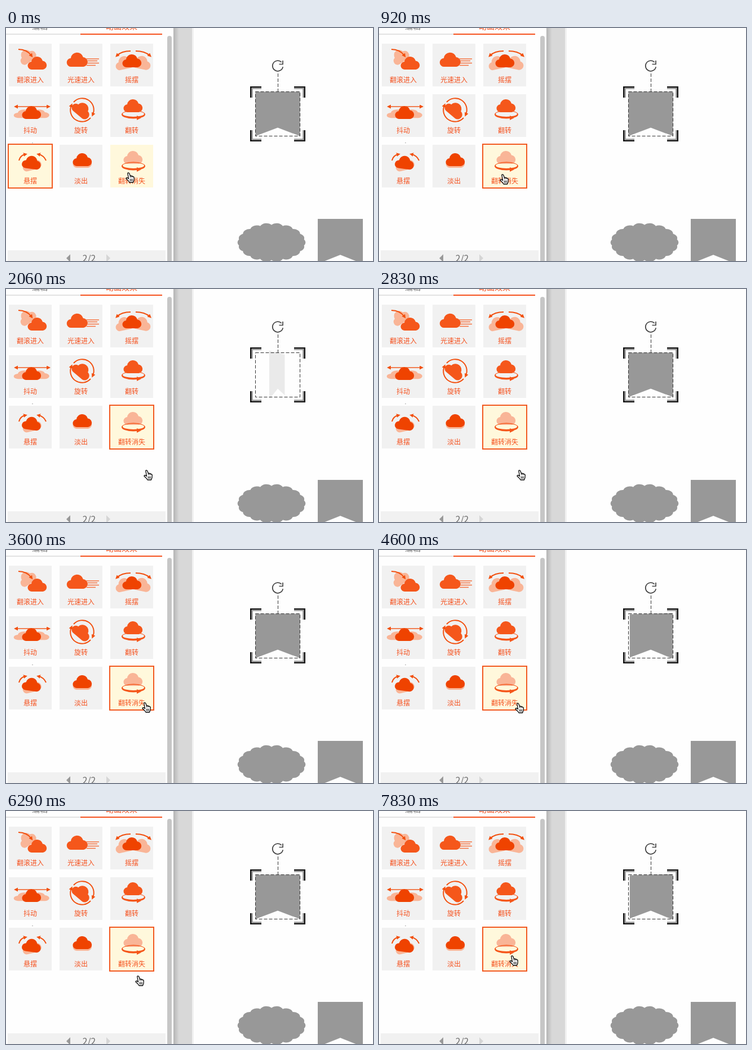
Write an HTML page that moves like this. It is 651 px wide and 415 px high and loops after 8000 ms.

```html
<!DOCTYPE html>
<html lang="zh">
<head>
<meta charset="utf-8">
<style>
html, body { margin: 0; width: 100%; height: 100%; overflow: hidden; background: #fefefe; }
svg { display: block; }
text { font-family: "Noto Sans CJK SC", "Noto Sans CJK", sans-serif; text-anchor: middle; }
.label { font-size: 12px; fill: #f5511e; }
.tab { font-size: 14px; }
.main { fill: #f5571b; }
.deep { fill: #ef4300; }
.pale { fill: #f9b597; }
.arrow { fill: none; stroke: #f2500f; stroke-width: 2; marker-end: url(#head); }
.thin { stroke-width: 1.4; }
.grey { fill: #989898; }
.dash { fill: none; stroke: #333; stroke-dasharray: 6 3; }
</style>
</head>
<body>
<svg width="651" height="415" viewBox="0 0 651 415">
  <defs>
    <path id="cloud" d="M-10 11A7 7 0 0 1-11-3A10.2 10.2 0 0 1 9-4.5A7.8 7.8 0 0 1 9.5 11Z"/>
    <g id="ring" class="main">
      <path fill-rule="evenodd" d="M-21 0A21 7.5 0 0 1 21 0A21 7.5 0 0 1-21 0ZM-19-1A19 5 0 0 0 19-1A19 5 0 0 0-19-1Z"/>
      <path d="M6 2L14 6L6 10Z"/>
    </g>
    <marker id="head" markerUnits="userSpaceOnUse" markerWidth="8" markerHeight="8" refX="3" refY="3.5" orient="auto">
      <path d="M0 0L7 3.5L0 7Z" fill="#f2500f"/>
    </marker>
    <linearGradient id="shade">
      <stop offset="0" stop-color="#b4b4b4"/>
      <stop offset=".3" stop-color="#d8d8d8"/>
    </linearGradient>
  </defs>

  <!-- panel frame -->
  <rect x="297" width="33" height="415" fill="url(#shade)"/>
  <rect x="330" width="3" height="415" fill="#f1f1f1"/>
  <rect x="286" y="14" width="8" height="420" rx="4" fill="#c6c6c6"/>
  <text class="tab" x="60" y="2" fill="#777">编辑</text>
  <text class="tab" x="205" y="2" fill="#f5511e">动画效果</text>
  <rect y="10" width="132" height="2" fill="#e2e2e2"/>
  <rect x="132" y="10" width="145" height="2" fill="#f5511e"/>
  <rect x="46" y="204" width="2" height="1" fill="#aaa"/>
  <rect x="3" y="396" width="280" height="19" fill="#f1f1f1"/>
  <path d="M114 403V417L107 410Z" fill="#999"/>
  <path d="M178 403V417L185 410Z" fill="#d5d5d5"/>
  <text x="147.5" y="416" font-size="15.5" fill="#666">2/2</text>

  <g id="cells"></g>

  <!-- icons, each around its own cell corner -->
  <g transform="translate(5 28)">
    <use href="#cloud" class="pale" transform="translate(33 22) rotate(-35) scale(.92 1)"/>
    <use href="#cloud" class="main" transform="translate(51 35)"/>
    <path class="arrow" d="M17 10Q32 10 40 21"/>
  </g>
  <g transform="translate(95 28)">
    <use href="#cloud" class="main" transform="translate(32 29) scale(1.1)"/>
    <path d="M47 27H70M49 30.5H67M49 34.5H70M48 38.5H64" stroke="#f5713f" stroke-width="1.4"/>
  </g>
  <g transform="translate(185 28)">
    <use href="#cloud" class="pale" transform="translate(26 34) rotate(-12)"/>
    <use href="#cloud" class="pale" transform="translate(56 34) rotate(12)"/>
    <use href="#cloud" class="deep" transform="translate(39 31)"/>
    <path class="arrow" d="M36 13Q20 13 12 21"/>
    <path class="arrow" d="M45 13Q61 13 70 21"/>
  </g>
  <g transform="translate(5 118)">
    <use href="#cloud" class="pale" transform="translate(28 35) scale(1.1 .65)"/>
    <use href="#cloud" class="pale" transform="translate(54 35) scale(1.1 .65)"/>
    <use href="#cloud" class="deep" transform="translate(41 33)"/>
    <path class="arrow thin" d="M39 22H13"/>
    <path class="arrow thin" d="M42 22H70"/>
  </g>
  <g transform="translate(135 146)">
    <use href="#cloud" class="main" transform="rotate(40) scale(1.05)"/>
    <path class="arrow" d="M-15-14A20.5 20.5 0 0 1 19 8"/>
    <path class="arrow" d="M15 14A20.5 20.5 0 0 1-19-8"/>
  </g>
  <g transform="translate(226 139)">
    <use href="#cloud" class="main"/>
    <use href="#ring" y="15"/>
  </g>
  <g transform="translate(5 208)">
    <use href="#cloud" class="pale" transform="translate(41 34) rotate(-14)"/>
    <use href="#cloud" class="deep" transform="translate(41 32) rotate(8)"/>
    <path class="arrow" d="M18 28Q20 19 29 17"/>
    <path class="arrow" d="M66 28Q62 19 53 17"/>
  </g>
  <g transform="translate(136 235)">
    <use href="#cloud" class="pale" y="3"/>
    <use href="#cloud" class="deep"/>
  </g>
  <g transform="translate(226 231)">
    <use href="#cloud" class="pale"/>
    <use href="#ring" y="15"/>
  </g>
  <g id="labels"></g>

  <!-- drawing area -->
  <path id="cloudlet" class="grey"/>
  <path class="grey" d="M553 340H633V420L593 404L553 420Z"/>
  <path id="ribbon" class="grey"/>
  <rect class="dash" x="442.5" y="113.5" width="79" height="79"/>
  <path class="dash" d="M482.5 81V113"/>
  <g id="corners" fill="none"></g>
  <g fill="none" stroke="#444" stroke-width="1.7">
    <path d="M488.6 60.9A9.3 9.3 0 1 0 491.2 69.1"/>
    <path d="M491 58V64.5H484.5"/>
  </g>

  <g id="hand" stroke="#000" stroke-linejoin="round" stroke-linecap="round">
    <path fill="#fff" stroke-width="1.3" d="M4 3C3 .4 6 0 7 2.5L8.5 7C9 5.7 11 6 11 7.3C11.8 6.3 13.3 7 13.3 8.2C14.3 7.6 15.4 8.4 15.2 10L15 14L13.5 18H7L5 15L1.2 11.5C.5 9.8 2.5 9.2 4 10.3L5.5 11.5Z"/>
    <path fill="none" stroke-width=".9" d="M8.2 12V15.5M10.2 12V15.5M12.2 12V15.5M8.5 7V9M11 7.5V9"/>
  </g>
</svg>
<script>
const LOOP = 8000;
const $ = id => document.getElementById(id);
const names = ['翻滚进入', '光速进入', '摇摆', '抖动', '旋转', '翻转', '悬摆', '淡出', '翻转消失'];
const corner = i => [5 + i % 3 * 90, 28 + Math.floor(i / 3) * 90];

names.forEach((name, i) => {
  const [x, y] = corner(i);
  $('cells').innerHTML += `<rect x="${x}" y="${y}" width="76" height="76"/>`;
  $('labels').innerHTML += `<text class="label" x="${x + 38}" y="${y + 69}">${name}</text>`;
});

for (const [sx, sy] of [[1, 1], [-1, 1], [1, -1], [-1, -1]]) {
  $('corners').innerHTML += `<g transform="translate(482 153) scale(${sx} ${sy})">
    <path d="M-47.7-29V-47.7H-29" stroke="#111" stroke-width="2.6"/>
    <path d="M-45.2-29V-45.2H-29" stroke="#999" stroke-width="2"/></g>`;
}

// scalloped ellipse: 18 bumps between notches
let scallop = '';
for (let i = 0; i <= 18; i++) {
  const a = (i * 20 - 90) * Math.PI / 180;
  const p = `${471 + 58.5 * Math.cos(a)} ${382 + 31.2 * Math.sin(a)}`;
  scallop += i ? `A12 8.5 0 0 1 ${p}` : `M${p}`;
}
$('cloudlet').setAttribute('d', scallop + 'Z');

function styleCell(i, fill, selected) {
  const cell = $('cells').children[i], [x, y] = corner(i), grow = selected ? 1 : 0;
  const attrs = {
    x: x - grow, y: y - grow, width: 76 + 2 * grow, height: 76 + 2 * grow,
    fill, stroke: selected ? '#f2581f' : 'none', 'stroke-width': 2
  };
  for (const k in attrs) cell.setAttribute(k, attrs[k]);
}

// cursor: time, left, top
const path = [
  [0, 212, 257], [900, 212, 257], [1340, 244, 322], [3350, 244, 322],
  [3600, 241, 271], [3779, 241, 271], [3780, 241, 272], [6000, 241, 272],
  [6290, 229, 293], [6380, 222, 296], [6460, 221, 289], [6630, 231, 258],
  [7049, 231, 258], [7050, 231, 257], [LOOP, 231, 257]
];

function handAt(t) {
  const i = path.findIndex(k => k[0] > t), a = path[i - 1], b = path[i];
  const f = (t - a[0]) / (b[0] - a[0]);
  return [1, 2].map(n => Math.round(a[n] + (b[n] - a[n]) * f));
}

// swing back a little, pause, then turn edge-on while fading, then return
const starts = [950, 4240, 7460];
function flipAt(t) {
  const u = t - Math.max(...starts.filter(s => s <= t));
  if (!(u >= 0) || u >= 1880) return [0, 1];
  if (u >= 1230) return [90, 0];
  if (u < 525) return [-15 * Math.min(1, u / 360), 1];
  const p = (u - 525) / 725;
  return [-15 + 105 * p, 1 - p];
}

const outline = [[-39.5, -39.5], [39.5, -39.5], [39.5, 39.5], [0, 24.5], [-39.5, 39.5]];
function drawRibbon(angle, opacity) {
  const a = angle * Math.PI / 180;
  const pts = outline.map(([x, y]) => {
    const k = 400 / (400 + x * Math.sin(a));
    return `${482 + x * Math.cos(a) * k} ${153 + y * k}`;
  });
  $('ribbon').setAttribute('d', `M${pts.join('L')}Z`);
  $('ribbon').setAttribute('opacity', opacity);
}

names.forEach((_, i) => styleCell(i, '#f1f1f1', false));

function frame() {
  const t = performance.now() % LOOP, chosen = t >= 720;
  styleCell(6, chosen ? '#f1f1f1' : '#fff8dc', !chosen);
  styleCell(8, '#fff8dc', chosen);
  drawRibbon(...flipAt(t));
  $('hand').setAttribute('transform', `translate(${handAt(t)})`);
  requestAnimationFrame(frame);
}
frame();
</script>
</body>
</html>
```
